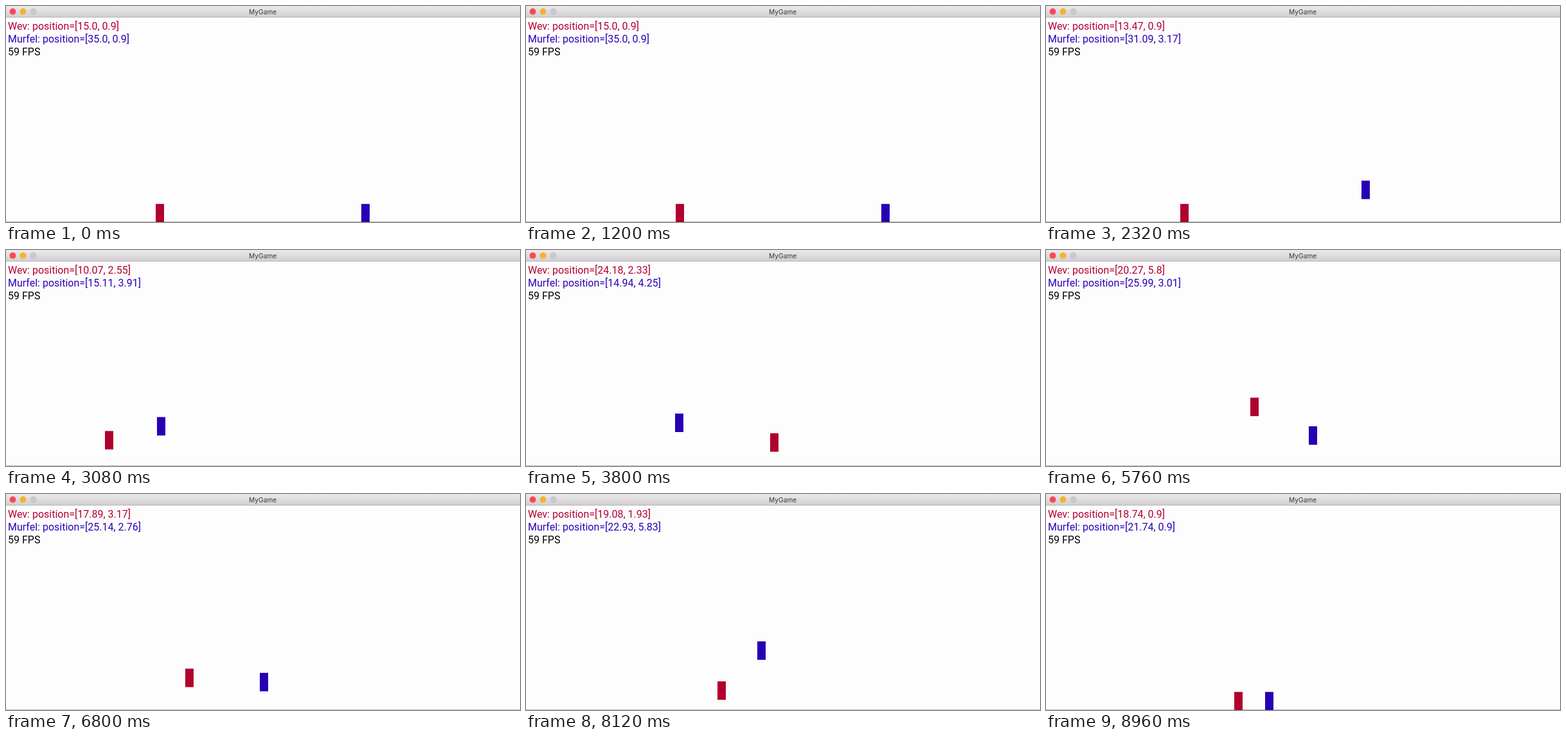
Recreate the animation shown at these times as an HTML page. Size 800 px wide and 337 px high, loop 9 s.

```html
<!DOCTYPE html>
<html lang="en">
<head>
<meta charset="utf-8">
<title>MyGame</title>
<style>
  html, body { margin: 0; width: 100%; height: 100%; overflow: hidden; background: #fefdfe; }
  svg { display: block; width: 100vw; height: 100vh; }
  .hud { font: 16px Roboto, sans-serif; }
  .title { font: 10.2px Inter, sans-serif; fill: #3c3a3c; text-anchor: middle; }
</style>
</head>
<body>
<svg viewBox="0 0 800 337">
  <defs>
    <linearGradient id="bar" x2="0" y2="1">
      <stop offset="0" stop-color="#ebe9eb"/>
      <stop offset="1" stop-color="#d1cfd1"/>
    </linearGradient>
  </defs>
  <rect width="800" height="337" fill="#fefdfe"/>
  <rect y="336" width="800" height="1" fill="#bfbdbf"/>
  <rect width="800" height="17" fill="url(#bar)"/>
  <rect y="17" width="800" height="1" fill="#b8b6b8"/>
  <circle cx="10.5" cy="8.7" r="4.9" fill="#fc4652"/>
  <circle cx="26.5" cy="8.7" r="4.9" fill="#f6b426"/>
  <circle cx="42.5" cy="8.7" r="4.7" fill="#cbc9cb" stroke="#bdbbbd" stroke-width=".6"/>
  <text class="title" x="399.7" y="12.6">MyGame</text>
  <g class="hud">
    <text id="redLabel" x="3" y="37" fill="#b00030"/>
    <text id="blueLabel" x="3" y="57" fill="#2a00b4"/>
    <text x="3" y="77" fill="#000">59 FPS</text>
  </g>
  <rect id="redBox" width="13" height="28.8" fill="#b0002e"/>
  <rect id="blueBox" width="13" height="28.8" fill="#2800b4"/>
</svg>
<script>
const LOOP = 9000, TICK = 40;
const STEP = 8.13;          // ms per physics step
const STRIDE = 0.17;        // distance walked per step
const AIR_STEPS = 89;
const FLOOR = 0.9, UNIT = 16;

const round2 = v => Math.round(v * 100) / 100;
const byId = id => document.getElementById(id);

// path: [time, x] turning points; jumps: [launch time, lift]
const players = [
  {
    name: 'Wev', box: byId('redBox'), label: byId('redLabel'),
    path: [[0, 15], [2247, 15], [2320, 13.47], [2486, 10], [3122, 10], [3800, 24.18], [3857, 25.37],
           [4595, 25.37], [4880, 19.42], [5100, 14.8], [5500, 14.8], [5765, 20.4], [6680, 20.4],
           [6800, 17.89], [6900, 15.8], [7963, 15.8], [8120, 19.08], [8200, 20.75], [8600, 20.75],
           [8696, 18.74]],
    jumps: [[3027, .01], [3751, .01], [4547, .01], [5271, .01], [5995, .01], [6719, .01],
            [7437, .01], [8161, .01]]
  },
  {
    name: 'Murfel', box: byId('blueBox'), label: byId('blueLabel'),
    path: [[0, 35], [2133, 35], [2320, 31.09], [3295, 10.69], [3597, 10.69], [3800, 14.94],
           [4300, 25.4], [4648, 25.4], [4880, 20.55], [5000, 18], [5300, 18], [5680, 26],
           [6759, 26], [6800, 25.14], [6900, 23], [7200, 23], [7366, 26.5], [7950, 26.5],
           [8120, 22.93], [8177, 21.74]],
    jumps: [[2239, .01], [2963, .01], [3670, .01], [4392, .04], [5116, .01], [5840, .01],
            [6735, .01], [7632, .04]]
  }
];

function walk(path, t) {
  const next = path.findIndex(p => p[0] > t);
  let x = path[path.length - 1][1];
  if (next > 0) {
    const [t0, x0] = path[next - 1], [t1, x1] = path[next];
    x = x0 + (x1 - x0) * (t - t0) / (t1 - t0);
  }
  const start = path[0][1];
  return round2(start + STRIDE * Math.round((x - start) / STRIDE));
}

function height(jumps, t) {
  const jump = jumps.filter(j => j[0] <= t).pop();
  if (!jump) return FLOOR;
  const steps = Math.round((t - jump[0]) / STEP);
  if (steps < 1 || steps >= AIR_STEPS) return FLOOR;
  // launch speed 15, gravity 20, position kept to two decimals
  const dt = 0.017;
  let y = FLOOR + jump[1];
  for (let i = 0; i < steps; i++) {
    const speed = 15 - 20 * dt * i;
    y += round2(speed * dt - 10 * dt * dt);
  }
  return y < FLOOR ? FLOOR : round2(y);
}

const decimal = v => Number.isInteger(v) ? v.toFixed(1) : String(v);

function draw(time) {
  const t = Math.floor((time % LOOP) / TICK + 1e-6) * TICK;
  for (const { name, box, label, path, jumps } of players) {
    const x = walk(path, t), y = height(jumps, t);
    box.setAttribute('x', Math.round(x * UNIT - 6.8));
    box.setAttribute('y', 323.2 - y * UNIT);
    label.textContent = `${name}: position=[${decimal(x)}, ${decimal(y)}]`;
  }
}

let origin;
function tick(now) {
  origin ??= now;
  draw(now - origin);
  requestAnimationFrame(tick);
}
draw(0);
requestAnimationFrame(tick);
</script>
</body>
</html>
```
